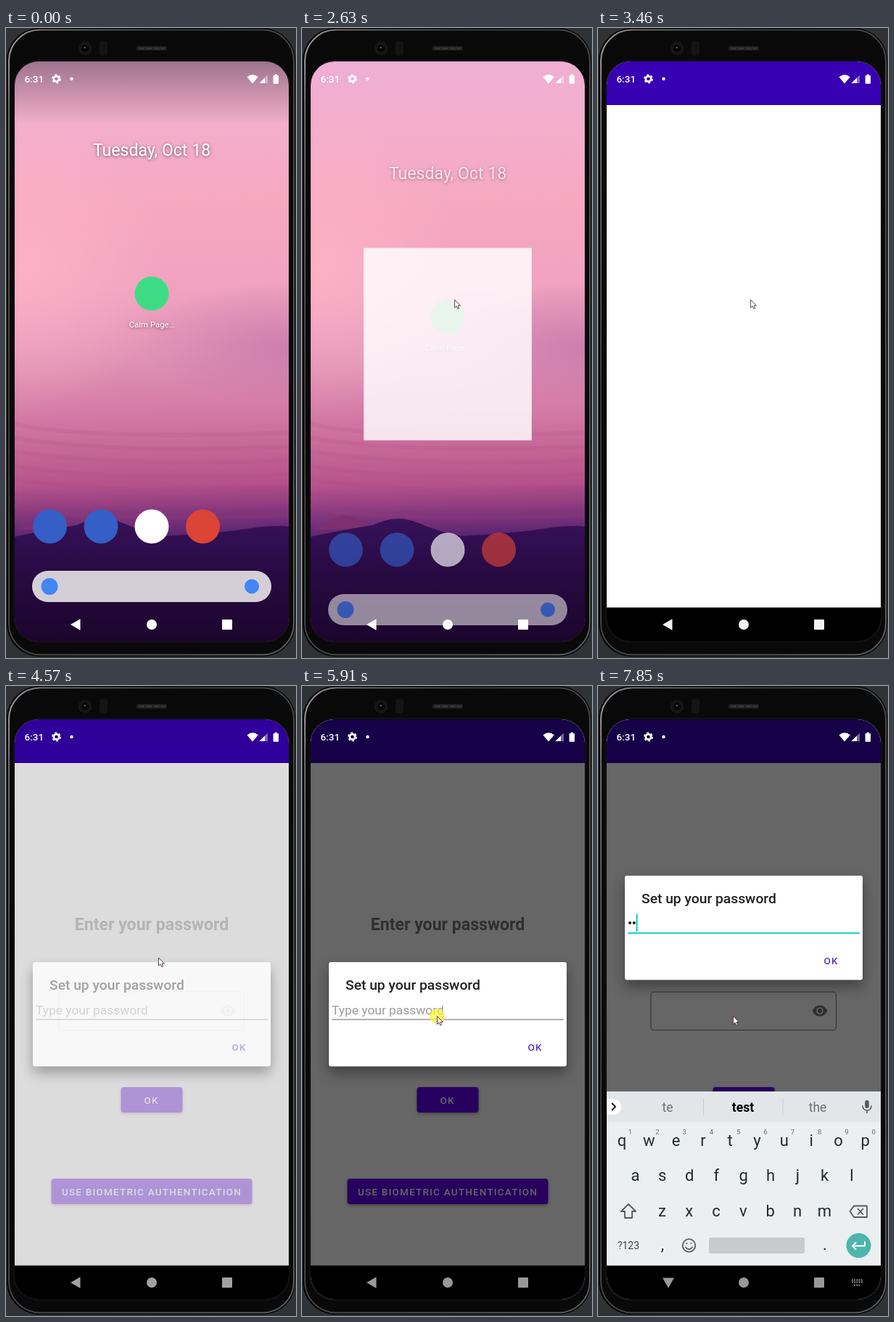
Animation of 400 by 867 pixels, one loop 8 s. Source, as an HTML page:

```html
<!DOCTYPE html>
<html lang="en">
<head>
<meta charset="utf-8">
<title>Password setup on a phone</title>
<style>
  html, body { margin: 0; width: 100%; height: 100%; overflow: hidden; background: #303335; }
  svg { display: block; width: 400px; height: 867px; font-family: Roboto, sans-serif; }
  .mid { text-anchor: middle; }
  .caps { font-size: 13.5px; font-weight: 500; letter-spacing: .0893em; }
  .home text { filter: drop-shadow(0 1px 2px rgba(0,0,0,.55)); }
  .btn { filter: drop-shadow(0 2px 2px rgba(0,0,0,.35)); }
  #card { filter: drop-shadow(0 9px 9px rgba(0,0,0,.38)); }
  .line { fill: none; stroke: #545b60; stroke-width: 1.8; stroke-linejoin: round; stroke-linecap: round; }
</style>
</head>
<body>
<svg viewBox="0 0 400 867">
  <defs>
    <clipPath id="screen"><rect x="12" y="46" width="378" height="798" rx="33"/></clipPath>
    <linearGradient id="sky" gradientUnits="userSpaceOnUse" x1="190" y1="46" x2="205" y2="700">
      <stop offset="0" stop-color="#efaed4"/>
      <stop offset=".14" stop-color="#f3aecb"/>
      <stop offset=".3" stop-color="#f6a8c1"/>
      <stop offset=".48" stop-color="#f0a2bf"/>
      <stop offset=".62" stop-color="#e193b6"/>
      <stop offset=".74" stop-color="#d47ba5"/>
      <stop offset=".82" stop-color="#c46695"/>
      <stop offset=".89" stop-color="#b5528b"/>
      <stop offset=".945" stop-color="#88397e"/>
      <stop offset="1" stop-color="#5a2470"/>
    </linearGradient>
    <radialGradient id="glow">
      <stop offset="0" stop-color="#ffb4c8" stop-opacity=".8"/>
      <stop offset="1" stop-color="#ffb4c8" stop-opacity="0"/>
    </radialGradient>
    <radialGradient id="haze">
      <stop offset="0" stop-color="#c273a8" stop-opacity=".65"/>
      <stop offset="1" stop-color="#c273a8" stop-opacity="0"/>
    </radialGradient>
    <linearGradient id="hill" x1="0" y1="0" x2="0" y2="1">
      <stop offset="0" stop-color="#37125a"/>
      <stop offset=".35" stop-color="#2b0b47"/>
      <stop offset="1" stop-color="#1b052c"/>
    </linearGradient>
    <linearGradient id="shade" x1="0" y1="0" x2="0" y2="1">
      <stop offset="0" stop-color="#000" stop-opacity=".34"/>
      <stop offset="1" stop-color="#000" stop-opacity="0"/>
    </linearGradient>
    <linearGradient id="rim" x1="0" y1="0" x2="1" y2="1">
      <stop offset="0" stop-color="#b9aab6"/>
      <stop offset=".06" stop-color="#6f6b70"/>
      <stop offset=".3" stop-color="#3a3a3c"/>
      <stop offset="1" stop-color="#5b5d5f"/>
    </linearGradient>
  </defs>

  <rect x="1" y="0" width="398" height="865" rx="45" fill="#050506"/>
  <rect x="4" y="2.5" width="393" height="860" rx="43" fill="#09090a" stroke="url(#rim)" stroke-width="2"/>
  <circle cx="109" cy="28" r="9.5" fill="#151516"/>
  <circle cx="109" cy="28" r="5" fill="#050507"/>
  <circle cx="108.5" cy="27" r="1.3" fill="#55585c"/>
  <rect x="129" y="18" width="11" height="20" rx="4" fill="#141415"/>
  <rect x="180" y="25" width="42" height="6" rx="3" fill="#242425"/>
  <path d="M184 28H219" stroke="#39393b" stroke-width="2" stroke-dasharray="7 3"/>
  <rect x="11" y="45" width="380" height="800" rx="34" fill="#000" stroke="#1d1c1f"/>

  <g clip-path="url(#screen)">
    <g>
      <rect x="12" y="46" width="378" height="798" fill="url(#sky)"/>
      <ellipse cx="30" cy="330" rx="190" ry="200" fill="url(#glow)"/>
      <ellipse cx="385" cy="440" rx="200" ry="90" fill="url(#haze)"/>
      <g id="bands" fill="none" stroke="#a6407f" stroke-opacity=".13" stroke-width="6"></g>
      <path d="M12 690Q42 682 45 675Q60 667 78 675L100 690Z" fill="#7e2f70"/>
      <path d="M12 700Q60 690 98 684Q130 668 160 681T220 699Q300 695 340 688Q365 684 390 686V844H12Z" fill="url(#hill)"/>
    </g>
    <rect id="scrim" x="12" y="46" width="378" height="86" fill="url(#shade)"/>
    <g id="home" class="home">
      <text class="mid" x="201" y="175.5" font-size="23.1" fill="#fff">Tuesday, Oct 18</text>
      <circle cx="201" cy="365.5" r="23.5" fill="#3ddc84"/>
      <text class="mid" x="201" y="412" font-size="11.4" fill="#fff">Calm Page…</text>
      <circle cx="60.5" cy="686" r="23.5" fill="#335fc6"/>
      <circle cx="131" cy="686" r="23.5" fill="#335fc6"/>
      <circle cx="201" cy="686" r="23.5" fill="#fff"/>
      <circle cx="271.5" cy="686" r="23.5" fill="#db4437"/>
      <rect x="36" y="747" width="330" height="43" rx="21.5" fill="#d4cfd7"/>
      <circle cx="60" cy="768.5" r="11.5" fill="#4285f4"/>
      <circle cx="339" cy="768.5" r="10" fill="#4285f4"/>
    </g>

    <rect id="splash" fill="#fff"/>
    <g id="bars">
      <rect x="12" y="46" width="378" height="60" fill="#3700b3"/>
      <rect x="12" y="797.5" width="378" height="47"/>
    </g>
    <g id="login">
      <text class="mid" x="201" y="336" font-size="23.1" font-weight="700" fill="#757575">Enter your password</text>
      <rect x="73" y="421" width="255.5" height="52.5" rx="4" fill="none" stroke="#858585" stroke-width="1.2"/>
      <path d="M295.5 447Q299 439.5 306 439.5T316.500 447Q313 454.500 306 454.500T295.500 447Z" fill="#757575"/>
      <circle cx="306" cy="447" r="4" fill="#757575" stroke="#fff" stroke-width="1.7"/>
      <g class="btn" fill="#6200ee">
        <rect x="158.500" y="552" width="85" height="35" rx="4"/>
        <rect x="62.500" y="678" width="277" height="35" rx="4"/>
      </g>
      <g class="caps" fill="#fff">
        <text x="190.500" y="574.500">OK</text>
        <text x="77" y="700.500">USE BIOMETRIC AUTHENTICATION</text>
      </g>
    </g>
    <rect id="dim" x="12" y="46" width="378" height="798"/>

    <g id="dialog">
      <rect id="card" x="37" y="380" width="328" height="143.500" rx="3" fill="#fff"/>
      <g id="form">
        <text x="60" y="418" font-size="19.25" font-weight="500" fill="#212121">Set up your password</text>
        <text id="hint" x="41" y="451.500" font-size="17.400" fill="#9b9b9b">Type your password</text>
        <g id="dots" fill="#212121">
          <circle cx="44" cy="445" r="2.100"/><circle cx="49.800" cy="445" r="2.100"/>
        </g>
        <rect id="rule" x="41" width="320"/>
        <rect id="caret" y="433" width="2" height="24" fill="#03cdbb"/>
        <text class="caps" x="311.500" y="502" fill="#5e35b8">OK</text>
      </g>
    </g>

    <g id="keys">
      <rect x="12" y="558" width="378" height="239.500" fill="#ebeff0"/>
      <rect x="12" y="558" width="378" height="42" fill="#e2e6e8"/>
      <path d="M145.500 568V591M255 568V591" stroke="#c6cbce"/>
      <path d="M12 568H21A11 11 0 0 1 21 590H12Z" fill="#fff"/>
      <path class="line" d="M19.500 574.500L24 579L19.500 583.500" style="stroke:#222;stroke-width:2"/>
      <rect x="368.200" y="570" width="5.600" height="11" rx="2.800" fill="#545b60"/>
      <path class="line" d="M365 578A6 6 0 0 0 377 578M371 584V587.500" style="stroke-width:1.600"/>
      <g id="words" class="mid" font-size="17.500" fill="#687074"></g>
      <g id="letters" class="mid" font-size="22" fill="#1f2b31"></g>
      <path class="line" d="M42 713L52 723H47V732H37V723H32Z"/>
      <path class="line" d="M347.500 723L353 715.500H371V731H353ZM358.500 719.500L365.500 727M365.500 719.500L358.500 727"/>
      <text class="mid" x="42" y="775" font-size="14" fill="#3a444a">?123</text>
      <circle class="line" cx="125.500" cy="770" r="8.800"/>
      <path class="line" d="M121 772.500Q125.500 778 130 772.500M122.500 767V767.200M128.500 767V767.200"/>
      <rect x="153" y="759" width="132" height="22" rx="3" fill="#c7cbce"/>
      <circle cx="359.500" cy="770" r="17" fill="#4db6ac"/>
      <path class="line" d="M368 765V770.500H351M355.500 766L351 770.500L355.500 775" style="stroke:#fff;stroke-width:2"/>
    </g>

    <g fill="#fff">
      <text x="25.500" y="75" font-size="13.500" font-weight="500">6:31</text>
      <g fill="none" stroke="#fff">
        <circle cx="69.500" cy="70" r="3.700" stroke-width="2.700"/>
        <circle cx="69.500" cy="70" r="5.500" stroke-width="1.800" stroke-dasharray="2.900 2.860"/>
      </g>
      <circle cx="90.500" cy="70" r="2.200"/>
      <path d="M332.500 67.500Q340 61 347.800 67.500L340 76.500Z"/>
      <path d="M349.500 76L361 64.500V76Z" opacity=".4"/>
      <path d="M349.500 76L357 68.500V76Z"/>
      <path d="M369.500 65.200H370.800V63.800H373.800V65.200H375.200Q376 65.200 376 66V76Q376 76.800 375.200 76.800H369.400Q368.600 76.800 368.600 76V66Q368.600 65.200 369.500 65.200Z"/>
    </g>
    <g id="nav">
      <path id="back" d="M89 821L102.500 813.200V828.800Z"/>
      <path id="down" d="M89 814.500H105L97 828.500Z"/>
      <circle cx="201" cy="821" r="7"/>
      <rect x="298" y="814" width="14" height="14" rx="1"/>
      <path id="mini" d="M350 817.500H365M350 820.500H365M353 824.500H362" stroke-width="1.800" stroke-dasharray="1.900 1.300"/>
    </g>
  </g>

  <circle id="tap" r="10.500" fill="#f8f23c" fill-opacity=".75"/>
  <path id="mouse" d="M.5 .5V11.500L3 9.200L4.800 13L6.600 12.200L5 8.500H8.500Z" fill="#fff" stroke="#4a2a3c" stroke-width=".9"/>
</svg>
<script>
const LOOP = 8000;
const el = Object.fromEntries([...document.querySelectorAll("[id]")].map(e => [e.id, e]));
const set = (id, attrs) => { for (const k in attrs) el[id].setAttribute(k, attrs[k]); };
const show = (id, on) => set(id, { opacity: +on });
const clamp = x => Math.min(1, Math.max(0, x));
const mix = (a, b, p) => a + (b - a) * p;
const smooth = p => p * p * (3 - 2 * p);

// Which of n evenly spaced steps between start and end is showing; 0 before the first
const step = (t, start, end, n) =>
  t < start ? 0 : Math.min(n, 1 + Math.floor((t - start) / (end - start) * (n - 1) + 1e-6));

function addText(parent, str, x, y, attrs = {}) {
  const node = document.createElementNS("http://www.w3.org/2000/svg", "text");
  node.textContent = str;
  for (const [k, v] of Object.entries({ x, y, ...attrs })) node.setAttribute(k, v);
  return parent.appendChild(node);
}

function build() {
  [["qwertyuiop", 33, 632.5], ["asdfghjkl", 51.5, 681], ["zxcvbnm", 88.5, 729.5]].forEach(([row, x0, y], r) => {
    [...row].forEach((c, i) => {
      const x = x0 + i * 37.3;
      addText(el.letters, c, x, y);
      if (!r) addText(el.letters, (i + 1) % 10, x + 11.5, 617, { "font-size": 9.5, fill: "#687074" });
    });
  });
  addText(el.letters, ",", 89, 776);
  addText(el.letters, ".", 313, 776);
  for (const x of [96, 200, 303]) addText(el.words, "", x, 586);
  let d = "";
  for (let i = 0; i < 7; i++) {
    const y = 545 + i * 19;
    d += `M12 ${y}Q${110 + 30 * (i % 3)} ${y + 22} 390 ${y + 12}`;
  }
  set("bands", {});
  el.bands.innerHTML = `<path d="${d}"/>`;
}

function drawLaunch(t) {
  const k = step(t, 2300, 3050, 11);
  const u = clamp((k - 1) / 8);
  const w = mix(47, 380, u ** .85), h = mix(47, 800, u ** 1.79);
  const cy = mix(365.5, 445, 1 - (1 - u) ** 3);
  set("home", { opacity: 1 - .7 * u, transform: `translate(0 ${64 * u})` });
  set("scrim", { opacity: clamp(1 - 2 * u) });
  set("splash", { x: 201 - w / 2, y: cy - h / 2, width: w, height: h, opacity: 1 - (1 - u) ** 2.5 });
  set("bars", { opacity: clamp((k - 8) / 3) });
  return k;
}

function drawDialog(t) {
  const k = step(t, 4570, 4700, 3);
  set("login", { opacity: [0, .33, .7, 1][k] });
  set("dim", { opacity: [0, .137, .4, .6][k] });
  set("card", { opacity: [0, .8, 1, 1][k] });
  set("form", { opacity: [0, .4, .75, 1][k] });
  return k;
}

function drawTyping(t) {
  const k = step(t, 5910, 6520, 9);
  const rise = [0, 0, 0, 0, .15, .6, .933, .985, 1, 1][k];
  const focus = k > 2;
  const typed = (t >= 7320) + (t >= 7780);
  set("dialog", { transform: `translate(0 ${-119 * rise})` });
  set("keys", { opacity: [0, 0, 0, 0, 0, .4, .87, 1, 1, 1][k], transform: `translate(0 ${119 * (1 - rise)})` });
  set("rule", focus ? { y: 458, height: 2, fill: "#1fd3c3" } : { y: 458.2, height: 1.5, fill: "#999" });
  show("caret", focus && !(t >= 7050 && t < 7320));
  set("caret", { x: 41.2 + 5.7 * typed });
  show("hint", !typed);
  [...el.dots.children].forEach((dot, i) => dot.setAttribute("opacity", +(typed > i)));

  const words = t >= 7850 ? ["te", "test", "the"] : t >= 7390 ? ["to", "the", "thanks"] : ["thanks", "I", "we"];
  [...el.words.children].forEach((node, i) => {
    const bold = words[i] === "test";
    if (node.textContent !== words[i]) node.textContent = words[i];
    node.setAttribute("font-weight", bold ? 700 : 400);
    node.setAttribute("fill", bold ? "#000" : "#687074");
  });
  return k;
}

function drawNav(t, launch, dialog, typing) {
  let level = launch < 9 ? 1 : [.8, .6, .45][launch - 9];
  if (t >= 3180) level = .45 + .1 * step(t, 3180, 3460, 5) + .05 * clamp((t - 3460) / 770);
  if (dialog) level = dialog === 1 ? .63 : .6;
  const grey = Math.round(255 * level), color = `rgb(${grey},${grey},${grey})`;
  set("nav", { fill: color, stroke: "none" });
  set("mini", { stroke: color });
  const open = typing > 4;
  show("back", !open);
  show("down", open);
  show("mini", open);
}

function drawMouse(t) {
  const enter = smooth(clamp((step(t, 790, 1500, 11) - 1) / 10));
  const move = smooth(step(t, 5230, 5510, 5) / 5);
  const x = mix(mix(393, 210, enter), 186, move);
  const y = mix(mix(637, 373.5, enter), 454, move);
  show("mouse", t >= 790);
  set("mouse", { transform: `translate(${x} ${y})` });
  show("tap", (t >= 2030 && t < 2100) || (t >= 5910 && t < 5980));
  set("tap", { cx: x + .5, cy: y + .5 });
}

function draw(t) {
  drawNav(t, drawLaunch(t), drawDialog(t), drawTyping(t));
  drawMouse(t);
}

build();
const start = performance.now();
function frame() {
  draw((performance.now() - start) % LOOP);
  requestAnimationFrame(frame);
}
frame();
</script>
</body>
</html>
```
